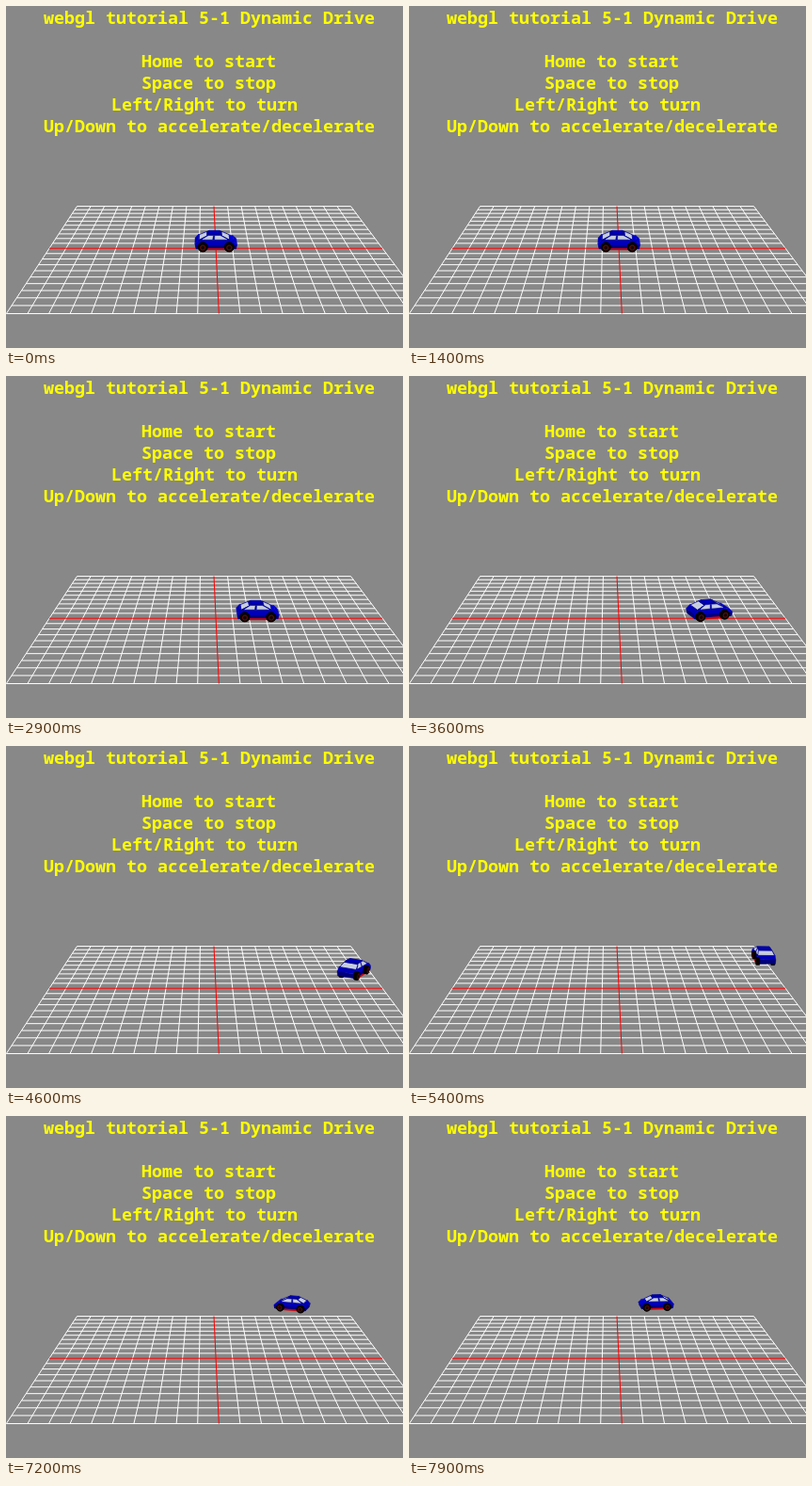
Write an HTML page with a canvas that moves like this. It is 422 px wide and 363 px high and loops after 8 s.

```html
<!DOCTYPE html>
<html lang="en">
<head>
<meta charset="utf-8">
<title>Dynamic Drive</title>
<style>
  html, body { margin: 0; width: 100%; height: 100%; overflow: hidden; background: #888; }
  canvas, svg { position: absolute; left: 0; top: 0; width: 422px; height: 363px; }
  text { font: bold 18.33px "Noto Sans Mono", "Liberation Mono", monospace; fill: #ff0; }
</style>
</head>
<body>
<canvas id="stage" width="422" height="363"></canvas>
<svg viewBox="0 0 422 363">
  <text x="40" y="19">webgl tutorial 5-1 Dynamic Drive</text>
  <text x="144" y="65">Home to start</text>
  <text x="144" y="88">Space to stop</text>
  <text x="112" y="111">Left/Right to turn</text>
  <text x="40" y="134">Up/Down to accelerate/decelerate</text>
</svg>
<script>
const ctx = document.getElementById('stage').getContext('2d');
const LOOP = 8000, STEP = 100;

// Camera: focal length in pixels, pitch, position over the grid
const FOCAL = 798, SIN = 0.2148, COS = 0.9767;
const CAM = { x: -0.66, height: 13.83, back: 43.11 };

function project(x, up, z) {
  const drop = CAM.height - up, ahead = CAM.back + z;
  const scale = FOCAL / (ahead * COS + drop * SIN);
  return [211.4 + (x - CAM.x) * scale, 182 + (drop * COS - ahead * SIN) * scale];
}

// Drive: speed builds up, stays constant, then the car follows a circle
const SPEED = 4.25, RADIUS = 6.15, GAIN = 0.61, START = 1.3, TURN = 3.185, LANE = -0.1;
const RAMP = Math.sqrt(SPEED / (3 * GAIN));

function carPose(seconds) {
  const straight = t => {
    const dt = Math.max(0, t - START), ramp = Math.min(dt, RAMP);
    return GAIN * ramp ** 3 + SPEED * (dt - ramp);
  };
  const heading = Math.max(0, seconds - TURN) * SPEED / RADIUS;
  return {
    x: straight(Math.min(seconds, TURN)) + RADIUS * Math.sin(heading),
    z: LANE + RADIUS * (1 - Math.cos(heading)),
    heading
  };
}

function line(from, to, color) {
  ctx.strokeStyle = color;
  ctx.lineWidth = 1;
  ctx.beginPath();
  ctx.moveTo(...from);
  ctx.lineTo(...to);
  ctx.stroke();
}

function drawGrid() {
  for (let i = -10; i <= 10; i++) {
    if (!i) continue;
    line(project(-10, 0, i), project(10, 0, i), '#fff');
    line(project(i, 0, -10), project(i, 0, 10), '#fff');
  }
  line(project(-10, 0, 0), project(10, 0, 0), '#f00');
  line(project(0, 0, -10), project(0, 0, 10), '#f00');
}

// Profiles from the rear over the top to the nose: [along, up, half width]
const BODY = [[-1.18, .2, .6], [-1.25, .5, .6], [-1.05, .73, .58], [.55, .74, .58],
  [1.02, .66, .58], [1.24, .46, .6], [1.18, .2, .6]];
const CABIN = [[-1, .72, .56], [-.52, .95, .46], [-.4, 1.02, .4], [.2, 1.02, .4],
  [.34, .95, .46], [.8, .72, .56]];
const SIDE_WINDOW = [[-.8, .75, .55], [-.46, .95, .46], [.26, .95, .46], [.64, .75, .55]];
const PILLAR = [[-.2, .74, .56], [-.16, .96, .46], [-.08, .96, .46], [-.1, .74, .56]];
const SKIRT = [[-1.18, .2, .6], [-1.22, .4, .6], [1.22, .4, .6], [1.18, .2, .6]];
const SILL = [[-.85, .12, .6], [-.85, .22, .6], [.85, .22, .6], [.85, .12, .6]];
const GLASS = '#c6cede';

function drawCar({ x, z, heading }) {
  const c = Math.cos(heading), s = Math.sin(heading);
  const place = ([along, up, side]) =>
    project(x + along * c - side * s, up, z + along * s + side * c);
  const area = pts => pts.reduce((sum, [px, py], i) => {
    const [qx, qy] = pts[(i + 1) % pts.length];
    return sum + px * qy - qx * py;
  }, 0);

  function face(points, fill, { edge, cull = true } = {}) {
    const pts = points.map(place);
    if (cull && area(pts) <= 0) return;
    ctx.beginPath();
    pts.forEach(p => ctx.lineTo(...p));
    ctx.closePath();
    ctx.fillStyle = fill;
    ctx.fill();
    ctx.strokeStyle = edge || fill;
    ctx.lineWidth = edge ? 0.8 : 0.4;
    ctx.stroke();
  }

  const mirror = ([along, up, side]) => [along, up, -side];
  function sides(points, fill, options) {
    face(points.map(mirror), fill, options);
    face([...points].reverse(), fill, options);
  }
  function solid(profile, sideFill, fills, edge) {
    for (let i = 0; i < profile.length - 1; i++) {
      const a = profile[i], b = profile[i + 1];
      face([mirror(a), a, b, mirror(b)], fills[i], { edge });
    }
    sides(profile, sideFill, { edge });
  }
  const circle = (along, side, r) => Array.from({ length: 16 }, (_, i) => {
    const a = i * Math.PI / 8;
    return [along - Math.cos(a) * r, .27 + Math.sin(a) * r, side];
  });

  function wheels(wantNear) {
    for (const sign of [-1, 1]) {
      const facing = -sign * area(circle(0, sign * .62, .27).map(place)) > 0;
      if (facing !== wantNear) continue;
      const axles = (s > 0) ? [.78, -.78] : [-.78, .78];
      for (const along of axles) {
        for (let w = .4; w < .64; w += .04)
          face(circle(along, sign * w, .27), '#080404', { cull: false });
        if (!facing) continue;
        face(circle(along, sign * .63, .16), '#641010', { cull: false });
        face(circle(along, sign * .63, .1), '#100808', { cull: false });
      }
    }
  }

  wheels(false);
  solid(BODY, '#0000bc',
    ['#000078', '#0000b4', '#0000c8', '#0000d8', '#0000c4', '#000080']);
  sides(SKIRT, '#00007c');
  sides(SILL, '#c80808');
  solid(CABIN, '#0000a0', [GLASS, '#0000a8', '#0000c0', '#0000a8', GLASS], '#000090');
  sides(SIDE_WINDOW, GLASS);
  sides(PILLAR, '#000098');
  wheels(true);
}

function frame(now) {
  const time = Math.floor(now % LOOP / STEP) * STEP;
  ctx.fillStyle = '#888';
  ctx.fillRect(0, 0, 422, 363);
  drawGrid();
  drawCar(carPose(time / 1000));
  requestAnimationFrame(frame);
}
requestAnimationFrame(frame);
</script>
</body>
</html>
```
